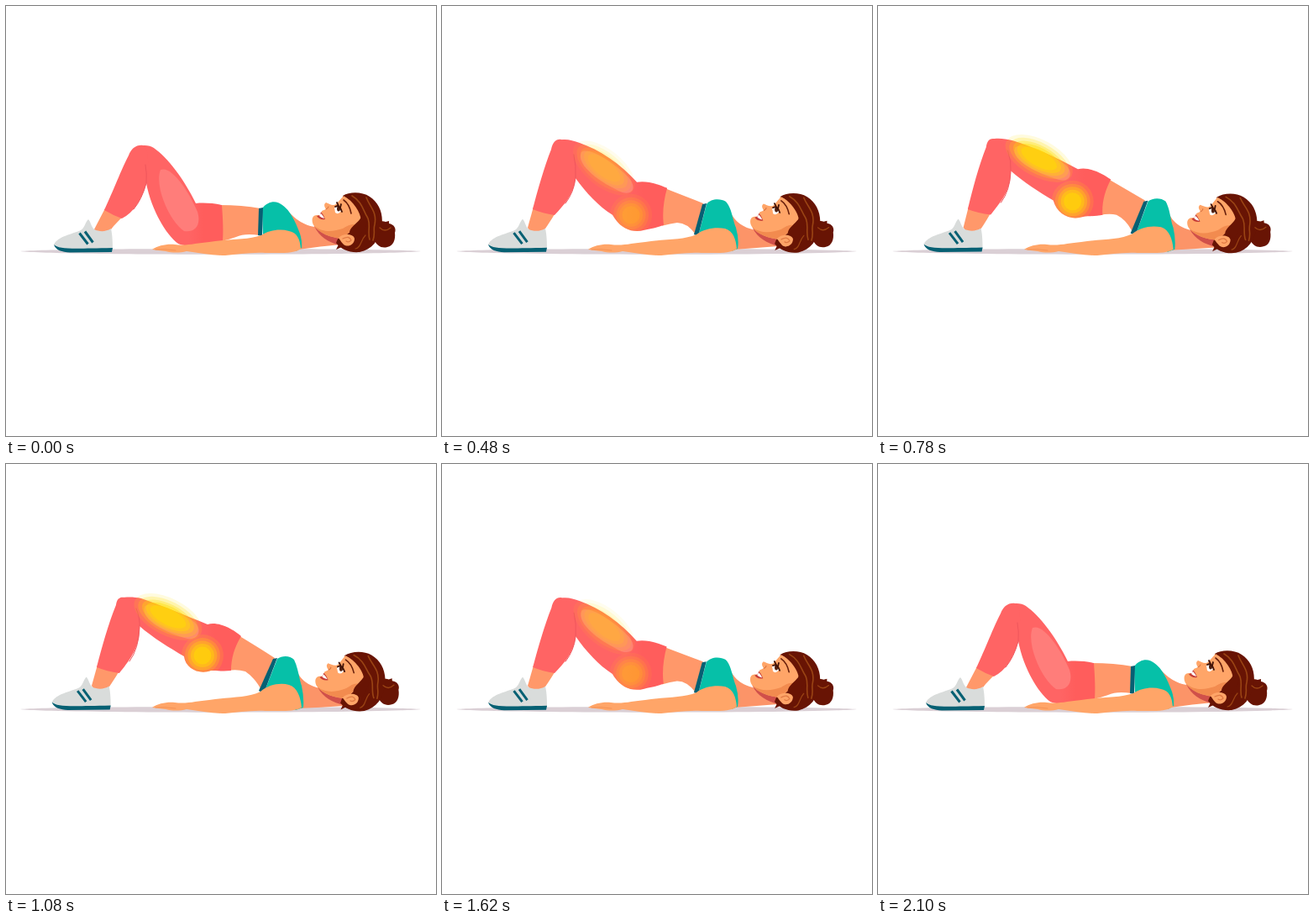
Animation, 512 px wide and 512 px high, one loop 2.25 s. Source, as an HTML page:

```html
<!DOCTYPE html>
<html lang="en">
<head>
<meta charset="utf-8">
<title>Glute bridge</title>
<style>
  html, body { margin: 0; width: 100%; height: 100%; overflow: hidden; background: #fff; }
  svg { display: block; width: 100%; height: 100%; }
  .skin { fill: #ffa568; }
  .shade { fill: #ff986a; }
  .pants { fill: #ff6464; }
  .teal { fill: #06c0a8; }
  .navy { fill: #066073; }
  .hair { fill: #681404; }
  .line { fill: none; stroke-linecap: round; stroke-linejoin: round; }
</style>
</head>
<body>
<svg viewBox="0 0 512 512">
  <defs>
    <linearGradient id="hip">
      <stop offset=".62" stop-color="#ff6464"/>
      <stop offset=".78" stop-color="#ff5d5c"/>
    </linearGradient>
    <clipPath id="seat"><path id="seatEdge"/></clipPath>
  </defs>

  <path fill="#dacfd5" d="M17 292 C60 288 450 288 494 292 C450 297 60 297 17 292Z"/>

  <path id="neck" fill="#fc9468"/>
  <path id="torso" class="shade"/>
  <path id="bra" class="teal"/>
  <path id="band" class="navy"/>

  <g id="head">
    <path fill="#d0504a" d="M367 262 C373 275 384 281 397 285 L403 272 L380 264Z"/>
    <g class="hair">
      <path d="M440 264 C441 257 447 255 452 257 L456 256 L456 259 C462 260 465 265 463 270 C464 278 461 286 454 287 C447 289 441 285 439 279Z"/>
      <path d="M401 226 C409 221 424 221 433 227 C445 235 450 249 447 264 C444 279 436 290 421 293 C409 294 399 290 393 282 L399 268 L403 240Z"/>
      <path d="M398 280 L393 290 L402 286Z"/>
    </g>
    <path class="skin" d="M402 226 L393 236 C389 239 384 235 381 234 C378 236 379 239 381 242 L376 244 L375 249 L370 249 C364 249 363 257 367 262 C373 270 386 276 401 277 C407 270 416 265 422 258 C425 250 415 233 402 226Z"/>
    <path fill="#f28b4f" d="M367 262 C379 271 391 268 401 265 C408 261 413 258 418 262 C411 266 406 272 401 277 C386 276 373 270 367 262Z"/>
    <path class="hair" d="M402 226 C413 231 421 241 424 249 C421 258 411 261 409 269 L420 276 L434 251 L420 226Z"/>
    <path class="skin" d="M396 276 C401 270 414 271 415 277 C415 284 407 288 402 284 Q399 281 396 276Z"/>
    <path class="line" stroke="#e07b45" stroke-width="1.3" d="M401 277 Q409 273 411 279 Q408 282 405 280"/>
    <g class="line" stroke="#9a4414" stroke-width="1.6">
      <path d="M412 226 C424 233 425 243 430 251 C435 259 430 269 433 278"/>
      <path d="M429 228 C433 239 442 245 439 260 C437 267 440 270 437 279"/>
      <path d="M416 289 C423 288 422 279 428 273" stroke-width="1.2"/>
      <path d="M445 264 Q451 270 458 264" stroke-width="1.3"/>
    </g>
    <path fill="#fff" d="M391 240 Q397 236 399 244 Q396 249 392 246Z"/>
    <ellipse cx="396" cy="241.5" rx="2" ry="3" fill="#52200f"/>
    <path class="line" stroke="#401207" stroke-width="1.8" d="M392 239 Q397 236 400 245 M396 238 L394 234 M398 240 L399 236"/>
    <path class="line" stroke="#681f0c" stroke-width="1.6" d="M402 231 Q409 236 411 247"/>
    <path fill="#c43b37" d="M375 245 Q378 248 380 254 Q373 255 370 250 L374 249Z"/>
    <path fill="#fff" d="M375 247 Q378 250 379 253 Q375 252 373 250Z"/>
    <path class="line" stroke="#d8713f" stroke-width="1" d="M381 242 Q384 241 384 239"/>
  </g>

  <path id="ankle" class="shade"/>
  <path id="thigh" fill="url(#hip)"/>
  <path id="shine" fill="#ff7d7a"/>
  <path id="calf" class="pants"/>
  <path id="crease" class="line" stroke="#ef565c" stroke-width="1"/>

  <g id="glow" fill="#ffdc00">
    <g id="front"></g>
    <g clip-path="url(#seat)"><g id="back"></g></g>
  </g>

  <g id="shoe">
    <path fill="#d9dcdb" d="M57 284 C62 274 78 272 89 267 C94 264 94 258 98 254 C101 257 101 262 105 266 C111 269 119 269 125 265 C127 274 127 284 127 290 L70 291Z"/>
    <path class="navy" d="M57 284 C64 290 77 289 127 288 L126 293 L76 293.5 C67 293 59 291 57 284Z"/>
    <path class="line" stroke="#066073" stroke-width="3" style="stroke-linecap:butt" d="M87.5 270.5 L97.5 283.5 M94 268.5 L103.5 281.5"/>
  </g>

  <path id="arm" class="skin"/>
  <path class="line" stroke="#f28d50" stroke-width=".8" d="M178 290 Q190 289 202 291"/>
</svg>
<script>
  const $ = id => document.getElementById(id);
  const MID = .45;   // lift at which the middle pose stands

  // Each shape in three poses: lying, halfway, lifted.
  const shapes = {
    neck: [
      'M328 238 C338 244 346 260 368 263 L398 270 L399 284 Q375 286 348 290Z',
      'M337 234 C344 246 348 261 370 266 L400 274 L400 286 Q375 288 348 290Z',
      'M341 234 C347 250 351 261 373 267 L402 276 L402 288 Q375 290 348 291Z'],
    torso: [
      'M250 237 Q280 237 303 241 L302 273 Q284 270 274 275 Q266 278 256 280Z',
      'M262 216 Q290 227 311 235 L302 272 Q292 258 280 258 Q272 259 262 262Z',
      'M275 203 Q300 218 320 231 L305 271 Q297 255 285 247 Q275 244 264 246Z'],
    bra: [
      'M305 241 C312 232 322 231 329 237 C338 243 344 256 348 266 Q353 277 352 288 L345 292 L306 274Z',
      'M315 236 C320 229 332 229 338 233 C345 240 346 255 350 264 Q354 278 352 289 L345 292 L305 274Z',
      'M323 232 C329 228 338 228 343 233 C348 243 349 256 352 264 Q355 278 354 290 L345 293 L307 273Z'],
    band: [
      'M301 241 L306 240 L305 274 L300 273Z',
      'M310 236 L315 235 L305 274 L300 272Z',
      'M318 232 L323 231 L307 273 L301 270Z'],
    ankle: [
      'M118 241 L105 266 L109 273 L122 270 Q128 261 138 252Z',
      'M109 239 L102 264 L107 271 L121 268 Q128 258 134 248Z',
      'M109 239 L102 264 L107 271 L121 268 Q128 258 134 248Z'],
    thigh: [
      'M152 172 C158 164 170 165 176 169 C193 181 212 206 226 235 C236 234 248 235 257 237 C258 250 259 266 258 280 C250 283 240 284 231 284 C222 286 211 286 205 283 C190 272 173 242 167 211 C164 196 157 184 152 172Z',
      'M138 161 C145 157 155 160 164 163 C187 171 213 188 232 210 C243 208 257 212 268 217 C264 231 262 247 264 261 C257 264 248 265 241 267 C226 271 212 265 203 249 C187 239 171 222 159 205 C155 190 146 175 138 161Z',
      'M136 160 C142 158 152 158 161 160 C185 168 213 180 240 191 C252 187 270 196 280 205 C272 218 268 232 268 246 C260 247 250 246 244 246 C230 251 214 244 212 229 C195 219 175 207 159 193 C157 183 147 171 136 160Z'],
    shine: [
      'M184 195 C198 190 218 222 228 245 C233 262 224 270 212 268 C196 258 176 215 184 195Z',
      'M166 174 C176 167 206 188 222 204 C232 216 228 226 214 222 C192 212 158 190 166 174Z',
      'M165 170 C172 162 205 175 224 188 C234 196 230 210 216 208 C192 202 160 186 165 170Z'],
    calf: [
      'M117 243 C127 222 138 193 146 178 C149 170 155 165 163 166 C172 170 169 196 167 211 C162 230 152 246 138 253 Q127 249 117 243Z',
      'M108 242 C114 219 122 191 130 171 C132 162 136 158 142 159 C155 163 161 188 159 205 C157 224 146 236 134 249 Q120 247 108 242Z',
      'M108 242 C114 219 122 190 131 168 C132 160 136 158 141 159 C155 162 160 180 159 195 C159 220 146 235 135 249 Q120 247 108 242Z'],
    crease: [
      'M166 189 Q168 200 167 211 Q162 230 152 242',
      'M157 177 Q160 190 159 205 Q157 222 147 235',
      'M155 172 Q160 184 159 195 Q158 220 147 235'],
    arm: [
      'M174 290 C181 285 192 283 201 284 C216 286 227 282 242 281 C266 277 287 279 304 273 C313 267 326 265 337 268 C347 270 350 278 351 289 C344 295 327 294 309 294 C291 293 276 296 261 297 C246 297 231 294 215 292 C207 294 198 294 190 292 Q181 291 174 290Z',
      'M174 290 C181 285 192 283 201 284 C216 286 227 282 242 281 C266 277 287 279 303 272 C312 265 326 263 337 265 C347 268 350 278 351 289 C344 295 327 294 309 294 C291 293 276 296 261 297 C246 297 231 294 215 292 C207 294 198 294 190 292 Q181 291 174 290Z',
      'M174 290 C181 285 192 283 201 284 C216 286 227 282 242 281 C266 277 287 279 303 271 C312 263 326 260 337 263 C347 266 351 278 352 290 C344 295 327 294 309 294 C291 293 276 296 261 297 C246 297 231 294 215 292 C207 294 198 294 190 292 Q181 291 174 290Z']
  };

  // Smooth curve through the three poses.
  const mix = (u, a, b, c) =>
    a * (u - MID) * (u - 1) / MID +
    b * u * (u - 1) / (MID * (MID - 1)) +
    c * u * (u - MID) / (1 - MID);

  const parts = Object.entries(shapes).map(([id, poses]) => ({
    el: $(id),
    text: poses[0],
    nums: poses.map(d => d.match(/\d+/g).map(Number))
  }));

  // Stacked ellipses, denser towards the middle.
  const rings = (id, radii) => {
    $(id).innerHTML = radii.map(([rx, ry], i) =>
      `<ellipse rx="${rx}" ry="${ry}" fill-opacity="${.13 + i * .09}"/>`).join('');
  };
  rings('front', [[44, 22], [39, 18.5], [34, 15], [29, 12.5], [23.5, 9.5]]);
  rings('back', [[25, 25], [21, 21], [17.5, 17.5], [14, 14], [10.5, 10.5]]);

  const place = (id, x, y, turn) =>
    $(id).setAttribute('transform', `translate(${x} ${y}) rotate(${turn})`);

  function pose(u) {
    const m = (a, b, c) => mix(u, a, b, c);
    for (const { el, text, nums: [a, b, c] } of parts) {
      let i = 0;
      el.setAttribute('d', text.replace(/\d+/g, () => {
        const v = m(a[i], b[i], c[i]).toFixed(2);
        i++;
        return v;
      }));
    }
    $('seatEdge').setAttribute('d', $('thigh').getAttribute('d'));
    place('front', m(203, 193, 193), m(228, 193, 182), m(62, 39, 27));
    place('back', m(219, 225, 234), m(268, 249, 228), 0);
    $('glow').setAttribute('opacity', Math.min(1, u * 1.2));
    place('shoe', m(0, -2, -2.3), m(0, -.3, -.4), 0);
    $('head').setAttribute('transform',
      `translate(${m(0, 2.8, 4.5)} ${-u * .5}) rotate(${-3 * u} 450 272)`);
  }

  const ease = x => (1 - Math.cos(Math.PI * Math.min(1, x))) / 2;
  const lift = t => t < 1050 ? ease(t / 1020) : 1 - ease((t - 1050) / 1050);

  const start = performance.now();
  function draw(now) {
    const t = Math.max(0, now - start) % 2250;
    pose(lift(Math.floor(t / 30) * 30));
    requestAnimationFrame(draw);
  }
  draw(start);
</script>
</body>
</html>
```
